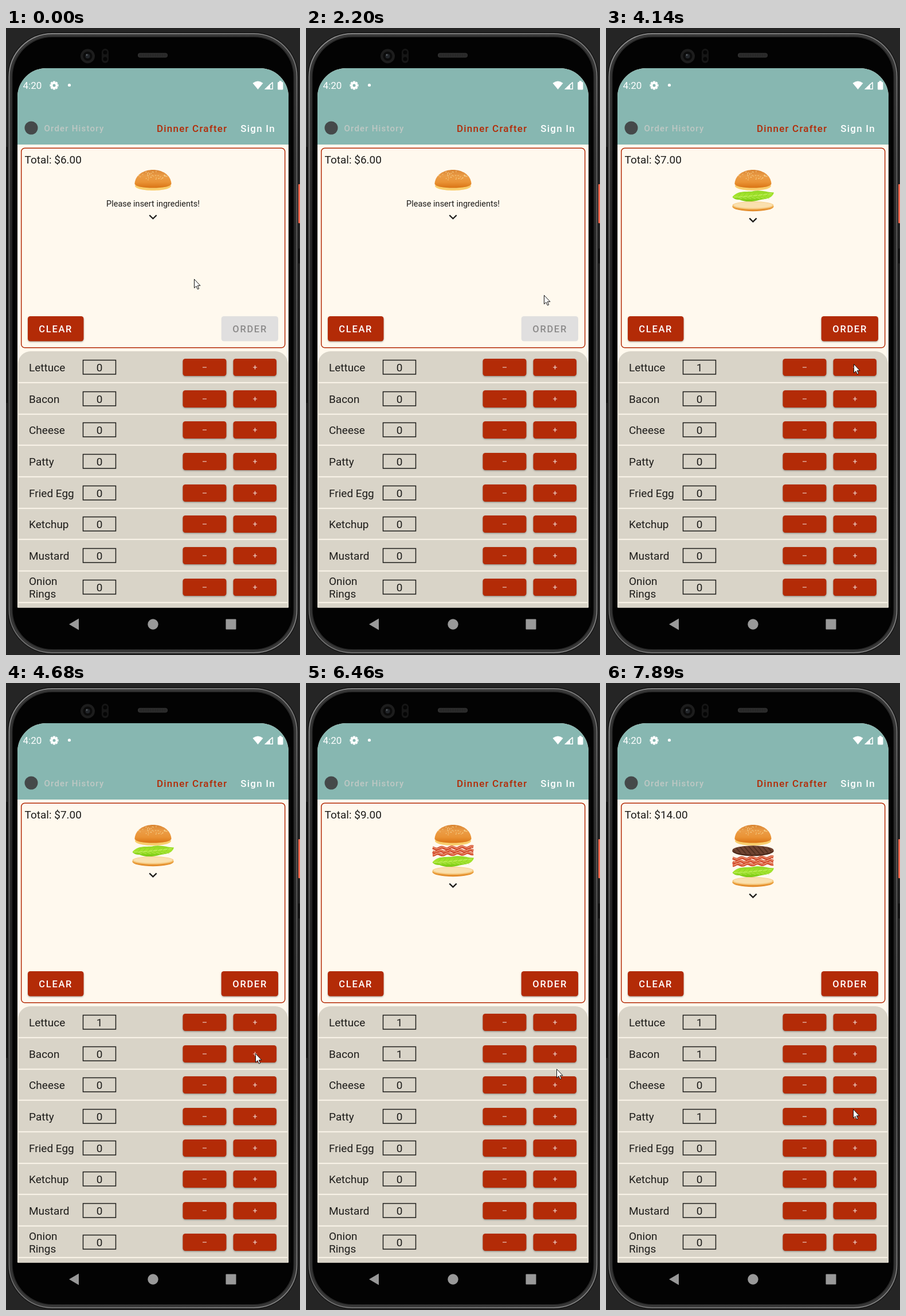
An HTML page with a canvas for the animation above (8 s loop, 513 by 1092 pixels).

```html
<!DOCTYPE html>
<html lang="en">
<head>
<meta charset="utf-8">
<title>Order screen</title>
<style>
  html, body { margin: 0; width: 100%; height: 100%; overflow: hidden; background: #252525; }
  canvas, svg { position: absolute; left: 0; top: 0; width: 513px; height: 1092px; }
  text { font-family: Roboto, "Open Sans", sans-serif; font-size: 19px; fill: #1d1c1a; }
  .nav { font-size: 17px; font-weight: 500; letter-spacing: 1.2px; }
  .btn { font-size: 16.5px; font-weight: 500; letter-spacing: 1.7px; fill: #fff; }
</style>
</head>
<body>
<canvas id="stage"></canvas>
<svg id="labels" viewBox="0 0 513 1092"></svg>
<script>
const W = 513, H = 1092, LOOP = 8000;
const RED = '#b32b07', CREAM = '#fff9ee', TEAL = '#87b7b1', INK = '#1d1c1a';
const names = ['Lettuce', 'Bacon', 'Cheese', 'Patty', 'Fried Egg', 'Ketchup', 'Mustard', 'Onion Rings'];
const rowY = i => Math.round(591 + 54.65 * i);

// time, row, price
const adds = [[4140, 0, 1], [6190, 1, 2], [7590, 3, 5]];
// start, end, row
const presses = [[4260, 4530, 0], [6190, 6460, 1], [7590, 7890, 3]];
// time, x, y
const path = [
  [0, 328, 437], [280, 308, 346], [430, 285, 225], [550, 268, 95], [670, 265, 51],
  [820, 265, 29], [1380, 284, 80], [1530, 305, 150], [1650, 365, 330], [1770, 393, 405],
  [2050, 393, 406], [2200, 415, 465], [2320, 435, 523], [2470, 421, 558], [2590, 412, 580],
  [2740, 432, 585], [4530, 435, 631], [4680, 435, 645], [4800, 433, 654], [5080, 434, 655],
  [5790, 434, 654], [6310, 437, 659], [6460, 437, 672], [6610, 442, 696], [6760, 438, 722],
  [6880, 429, 741], [7030, 430, 742], [7310, 431, 742]
];

const canvas = document.getElementById('stage'), svg = document.getElementById('labels');
const g = canvas.getContext('2d');
const dpr = window.devicePixelRatio || 1;
canvas.width = W * dpr;
canvas.height = H * dpr;
g.scale(dpr, dpr);

function node(tag, attrs, content = '') {
  const el = document.createElementNS('http://www.w3.org/2000/svg', tag);
  for (const k in attrs) el.setAttribute(k, attrs[k]);
  el.textContent = content;
  return svg.appendChild(el);
}
const label = (s, x, y, attrs = {}) => node('text', { x, y, ...attrs }, s);

label('4:20', 29.5, 106, { style: 'font-size:17px;fill:#fff' });
label('Order History', 66.5, 180, { class: 'nav', style: 'font-size:15px;fill:#bfc8c4' });
label('Dinner Crafter', 263, 181, { class: 'nav', style: 'fill:' + RED });
label('Sign In', 409.3, 181, { class: 'nav', style: 'fill:#fff' });
label('CLEAR', 57.3, 530, { class: 'btn' });
const total = label('', 32.5, 236);
const hint = label('Please insert ingredients!', 256.5, 311, { 'text-anchor': 'middle', style: 'font-size:14.5px' });
const order = label('ORDER', 395.3, 530, { class: 'btn' });
const counts = names.map((name, i) => {
  const y = rowY(i), words = name.split(' ');
  if (i === 7) words.forEach((w, k) => label(w, 40, y - 4 + k * 22));
  else label(name, 40, y + 7);
  return label('0', 163, y + 7, { 'text-anchor': 'middle' });
});
const cursor = node('path', {
  d: 'M.5 .5V15.8L4 12.6 6.4 18 8.7 17 6.3 11.7H11Z',
  fill: '#fff', stroke: '#111', 'stroke-width': 1
});

function box(x, y, w, h, r, fill, stroke, lw = 1) {
  g.beginPath();
  g.roundRect(x, y, w, h, r);
  if (fill) { g.fillStyle = fill; g.fill(); }
  if (stroke) { g.strokeStyle = stroke; g.lineWidth = lw; g.stroke(); }
}
function oval(x, y, rx, ry, fill) {
  g.beginPath();
  g.ellipse(x, y, rx, ry, 0, 0, 7);
  g.fillStyle = fill;
  g.fill();
}
function line(color, lw, ...pts) {
  g.beginPath();
  pts.forEach(([x, y]) => g.lineTo(x, y));
  g.strokeStyle = color;
  g.lineWidth = lw;
  g.stroke();
}
function poly(fill, ...pts) {
  g.beginPath();
  pts.forEach(([x, y]) => g.lineTo(x, y));
  g.fillStyle = fill;
  g.fill();
}
function fade(x0, y0, x1, y1, ...colors) {
  const f = g.createLinearGradient(x0, y0, x1, y1);
  colors.forEach((c, i) => f.addColorStop(i / (colors.length - 1), c));
  return f;
}
function random(seed) {
  return () => (seed = (seed * 16807) % 2147483647) / 2147483647;
}

function button(x, y, w, h, fill, lift = 1) {
  g.save();
  if (lift) {
    g.shadowColor = 'rgba(0,0,0,.34)';
    g.shadowBlur = (1 + 1.5 * lift) * dpr;
    g.shadowOffsetY = 1.3 * lift * dpr;
  }
  box(x, y, w, h, 4.5, fill);
  g.restore();
}

function phone() {
  g.fillStyle = '#252525';
  g.fillRect(0, 0, W, H);
  box(510, 272, 6, 68, 1, '#ee6a50');
  box(509, 384, 5, 26, 1, '#151515');
  box(-2, 207, 6, 446, 2, '#151515');
  box(3.5, 8, 506, 1082, 77, fade(0, 8, 0, 1090, '#2c2c2c', '#1a1a1a', '#1a1a1a', '#2c2c2c'), '#0c0c0c', 1);
  box(5.5, 10, 502, 1078, 75, null, fade(6, 10, 506, 1088, '#8a8a8a', '#636363', '#5c5c5c', '#7c7c7c'), 2);
  box(8.5, 13, 496, 1072, 72, null, fade(0, 13, 0, 1085, '#3c3c3c', '#2a2a2a', '#3c3c3c'), 2);
  box(11.5, 16, 490, 1066, 69, '#030303');

  oval(142.5, 49, 12.5, 12.5, '#1d1d1d');
  oval(142.5, 49, 8, 8, '#0b0b0b');
  oval(142.5, 49, 4, 4, '#23262a');
  oval(141, 47, 1.4, 1.4, '#5b6065');
  box(167, 36, 12, 25, 6, '#161616');
  oval(173, 42.5, 3.5, 3.5, '#050505');
  oval(173, 54, 3.5, 3.5, '#050505');
  box(230, 43.5, 52, 8, 4, '#303030');
  for (let x = 234; x < 280; x += 3) line('#1a1a1a', 1, [x, 45], [x, 50]);

  const grey = '#999';
  poly(grey, [110, 1038.5], [127, 1028.5], [127, 1048.5]);
  oval(256.5, 1038.5, 9.2, 9.2, grey);
  box(383.5, 1029.5, 18, 18, 1, grey);
}

function statusBar() {
  g.fillStyle = '#fff';
  for (let i = 0; i < 4; i++) {
    g.save();
    g.translate(84, 100);
    g.rotate(i * Math.PI / 4);
    g.fillRect(-2, -7.5, 4, 15);
    g.restore();
  }
  oval(84, 100, 5.7, 5.7, '#fff');
  oval(84, 100, 2.5, 2.5, TEAL);
  oval(110.5, 99.5, 2.6, 2.6, '#fff');
  g.beginPath();
  g.moveTo(439.5, 107);
  g.lineTo(430.5, 96);
  g.quadraticCurveTo(439.5, 89, 448.5, 96);
  g.fillStyle = '#fff';
  g.fill();
  line('#fff', 1.5, [465.2, 94.5], [465.2, 106.2], [453, 106.2], [465.2, 94.5]);
  poly('#fff', [451, 107], [461, 97], [461, 107]);
  box(474, 94, 9.5, 13.5, 1.5, '#fff');
  g.fillRect(476.7, 92, 4, 3);
}

function topBun() {
  g.beginPath();
  g.moveTo(225, 274);
  g.bezierCurveTo(223, 286, 290, 286, 288, 274);
  g.closePath();
  g.fillStyle = '#f9cd6c';
  g.fill();
  g.beginPath();
  g.moveTo(224.5, 271);
  g.bezierCurveTo(227, 239, 286, 239, 288.5, 271);
  g.bezierCurveTo(289, 281, 224, 281, 224.5, 271);
  g.fillStyle = fade(0, 247, 0, 279, '#d98432', '#eb9d47', '#ea9335', '#d87213');
  g.fill();
  const rnd = random(77);
  for (let i = 0; i < 42; i++) {
    const a = rnd() * 6.28, r = Math.sqrt(rnd());
    oval(256.5 + Math.cos(a) * r * 25, 257 + Math.sin(a) * r * 8, .8, .65, '#f8d692');
  }
}

function bottomBun(y) {
  oval(256.5, y + 10, 36.2, 8.2, fade(0, y + 6, 0, y + 18, '#f0b04f', '#e28a2a'));
  oval(256.5, y + 7.8, 36, 6.9, '#f6c97f');
  oval(256.5, y + 7.3, 34, 5.4, '#fae0ae');
}

function lettuce(y) {
  g.beginPath();
  g.moveTo(220.5, y + 12);
  g.bezierCurveTo(230, y - 1, 248, y + 4, 257, y + 1.5);
  g.bezierCurveTo(270, y - 1, 282, y + 4, 293, y + 4);
  g.bezierCurveTo(290, y + 15, 278, y + 15, 268, y + 17);
  g.bezierCurveTo(254, y + 21, 240, y + 20, 233, y + 16.5);
  g.quadraticCurveTo(225, y + 17, 220.5, y + 12);
  g.fillStyle = fade(0, y, 0, y + 19, '#8fd524', '#a6e52e', '#79c914');
  g.fill();
  line('#c9f26c', 1.2, [223, y + 12], [250, y + 10.5], [289, y + 6]);
  for (let x = 230; x < 280; x += 8) {
    line('#85ce24', .8, [x, y + 12], [x + 6, y + 5]);
    line('#bdec5c', .8, [x, y + 12], [x + 7, y + 15]);
  }
}

function bacon(y) {
  const wave = (dy, color, lw) => {
    const pts = [];
    for (let x = 221; x <= 292; x++) pts.push([x, y + dy + 1.4 * Math.sin(x * .36 + dy * .25) - (x - 256) * .03]);
    line(color, lw, ...pts);
  };
  [4.5, 10, 15].forEach(dy => {
    wave(dy, '#cf4327', 4.8);
    wave(dy - .6, '#f3b189', 1.2);
    wave(dy + 1.8, '#e2694a', .8);
  });
}

function patty(y) {
  oval(256.5, y + 10, 36.2, 8.8, '#482618');
  oval(256.5, y + 8.6, 36, 7.8, '#704331');
  g.save();
  g.beginPath();
  g.ellipse(256.5, y + 8.6, 34.5, 7, 0, 0, 7);
  g.clip();
  for (let x = 215; x < 300; x += 8) line('#53301f', 2, [x, y], [x + 16, y + 18]);
  g.restore();
}

const fillings = { 0: lettuce, 1: bacon, 3: patty };

function burger(stack) {
  const n = stack.length;
  if (n) bottomBun(301 + 18 * (n - 1));
  stack.forEach((id, i) => fillings[id](282.5 + 18 * (n - 1 - i)));
  topBun();
  const y = n ? 331.3 + 18 * (n - 1) : 326;
  line(INK, 2.3, [250.3, y], [256.5, y + 6], [262.7, y]);
}

function list(pressed) {
  box(21, 563, 471, 450, [22, 22, 0, 0], '#d9d4c8');
  names.forEach((_, i) => {
    const y = rowY(i);
    line(CREAM, 1.6, [22, y + 26.6], [491, y + 26.6]);
    box(134.5, y - 12.6, 57, 24.6, 0, null, INK, 1.5);
    button(308.5, y - 15, 76, 30, RED);
    button(396.5, y - 15, 75.5, 30, RED, pressed === i ? 2 : 1);
    line('#f6e5df', 1.2, [343, y], [350, y]);
    line('#f6e5df', 1.2, [431, y], [438, y]);
    line('#f6e5df', 1.2, [434.5, y - 3.5], [434.5, y + 3.5]);
  });
}

function screen(stack, pressed) {
  g.save();
  g.beginPath();
  g.roundRect(20, 70, 473, 939.5, [50, 50, 0, 0]);
  g.clip();
  g.fillStyle = CREAM;
  g.fillRect(20, 70, 473, 940);
  g.fillStyle = TEAL;
  g.fillRect(20, 70, 473, 133);
  statusBar();
  oval(44, 174, 11.5, 11.5, '#45494a');
  box(26.7, 209.2, 460, 347.5, 6, null, RED, 1.5);
  burger(stack);
  button(38, 502, 97.5, 43.5, RED);
  if (stack.length) button(375.7, 502, 99.3, 43.5, RED);
  else button(375.7, 502, 99.3, 43.5, '#e0dfdf', 0);
  list(pressed);
  g.restore();
}

function draw(t) {
  const done = adds.filter(a => t >= a[0]);
  const stack = done.map(a => a[1]);
  const press = presses.find(p => t >= p[0] && t < p[1]);
  phone();
  screen(stack, press ? press[2] : -1);

  total.textContent = 'Total: $' + done.reduce((sum, a) => sum + a[2], 6).toFixed(2);
  hint.style.display = stack.length ? 'none' : '';
  order.style.fill = stack.length ? '#fff' : '#8b8a8a';
  counts.forEach((el, i) => { el.textContent = stack.includes(i) ? '1' : '0'; });
  const [, x, y] = path.filter(p => t >= p[0]).pop();
  cursor.setAttribute('transform', `translate(${x} ${y})`);
}

const start = performance.now();
function tick() {
  draw((performance.now() - start) % LOOP);
  requestAnimationFrame(tick);
}
tick();
</script>
</body>
</html>
```
